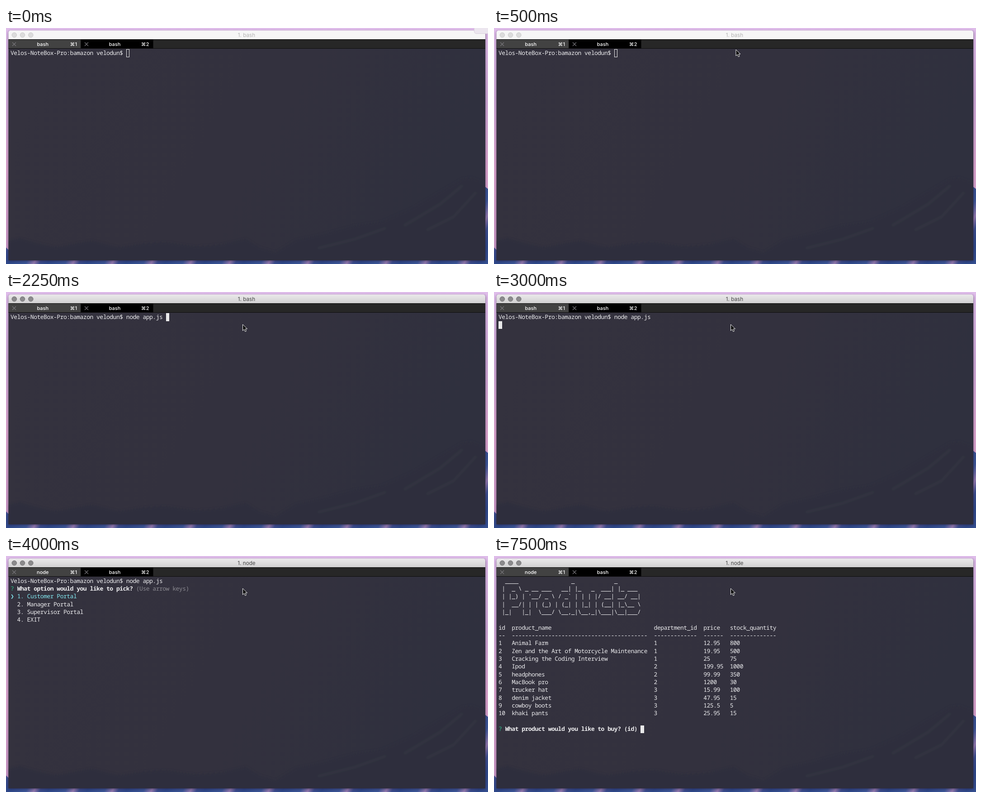
These frames come from a looping animation (1066 px wide and 525 px high, 8 s). An HTML page:

```html
<!DOCTYPE html>
<html lang="en">
<head>
<meta charset="utf-8">
<title>Terminal session</title>
<style>
  html, body { margin: 0; width: 100%; height: 100%; overflow: hidden; background: #d9b6e4; }
  #stage { position: relative; width: 1066px; height: 525px; overflow: hidden; }
  svg { position: absolute; left: 0; top: 0; }
  svg text { font: 11px Inter, sans-serif; fill: #fff; }
  #title { font-size: 11.7px; fill: #b4b4b4; text-anchor: middle; }
  .label { font-weight: 500; text-anchor: middle; }
  .key { font-weight: 500; text-anchor: end; }
  #bar { fill: #f6f6f6; }
  #lights circle { fill: #dcdcdc; stroke: #cacaca; }
  .focused #bar { fill: url(#chrome); }
  .focused #title { fill: #454545; }
  .focused #lights circle { fill: #8b8a8c; stroke: #717072; }
  #screen {
    position: absolute; left: 10px; top: 46.6px; margin: 0;
    font: 13px/17.34px "Noto Sans Mono", "DejaVu Sans Mono", monospace;
    letter-spacing: -.49px; color: #eeeef0; text-rendering: geometricPrecision;
  }
  #screen .ok { color: #2cc48c; }
  #screen .pick { color: #84eaf2; }
  #screen .hint { color: #8b8a91; }
  #caret { position: absolute; box-sizing: border-box; width: 7.5px; height: 17.5px; border: 1px solid #eee; }
  .focused #caret { background: #e9e9ea; }
</style>
</head>
<body>
<div id="stage">
  <svg width="1066" height="525">
    <defs>
      <linearGradient id="sky" x2="0" y2="1">
        <stop stop-color="#dfbdea"/><stop offset=".3" stop-color="#d0abd8"/>
        <stop offset=".6" stop-color="#dda6cf"/><stop offset="1" stop-color="#c796c4"/>
      </linearGradient>
      <linearGradient id="ridge" gradientUnits="userSpaceOnUse" x2="70" y2="34" spreadMethod="repeat">
        <stop stop-color="#2d4788"/><stop offset=".45" stop-color="#3b5596"/>
        <stop offset=".65" stop-color="#9279ad"/><stop offset=".8" stop-color="#3a4c8c"/>
        <stop offset="1" stop-color="#2d4788"/>
      </linearGradient>
      <linearGradient id="chrome" x2="0" y2="1">
        <stop stop-color="#ebeaeb"/><stop offset="1" stop-color="#d0cfd0"/>
      </linearGradient>
      <linearGradient id="glass" x2="1" y2=".25">
        <stop stop-color="#34323e"/><stop offset=".6" stop-color="#33313e"/><stop offset="1" stop-color="#2f303e"/>
      </linearGradient>
      <filter id="soft" x="-5%" y="-5%" width="110%" height="110%"><feGaussianBlur stdDeviation="2.5"/></filter>
      <clipPath id="frame"><path d="M5.5 517V10.500a5 5 0 0 1 5-5H1055a5 5 0 0 1 5 5V517Z"/></clipPath>
    </defs>

    <rect width="1066" height="525" fill="url(#sky)"/>
    <path fill="url(#ridge)" d="M0 488L6 494V517H1058V352L1066 358V525H0Z"/>
    <rect x="5" y="7" width="1056" height="512" rx="5" fill="#201830" opacity=".45" filter="url(#soft)"/>

    <g clip-path="url(#frame)">
      <rect x="5" y="45" width="1056" height="473" fill="url(#glass)"/>
      <g filter="url(#soft)">
        <path fill="#2d2f3c" d="M5 474L30 468 70 479 110 488 190 473 250 488 300 480 350 476 420 486 480 481 530 469 560 488 600 500V530H5Z"/>
        <path fill="#2d2f3d" d="M570 520L600 497 640 472 700 459 770 440 830 431 900 400 960 364 1010 335 1030 333 1064 346V530H570Z"/>
        <path fill="none" stroke="#333441" stroke-width="5" d="M1010 350L960 392 880 440M1040 365L990 420 930 450M840 445L770 470 690 490"/>
      </g>
      <rect id="bar" x="5" y="5" width="1056" height="21"/>
      <rect x="5" y="25.500" width="1056" height="20" fill="#272727"/>
      <rect x="5" y="26" width="160.500" height="19" fill="#424242"/>
      <rect x="166" y="26" width="159.500" height="19" fill="#000"/>
      <path stroke="#0c0c0c" d="M5 25.500H1061M5 45.500H1061M165.500 26V45"/>
      <path stroke="#77767a" stroke-width="1.2" d="M14 32l8 8m0-8l-8 8M174 32l8 8m0-8l-8 8"/>
    </g>
    <g id="lights">
      <circle cx="18.300" cy="15.600" r="5.300"/><circle cx="36.500" cy="15.600" r="5.300"/><circle cx="54.800" cy="15.600" r="5.300"/>
    </g>
    <text id="title" x="532" y="20"></text>
    <text id="tab" class="label" x="81.300" y="40"></text>
    <text class="key" x="157" y="40">⌘1</text>
    <text class="label" x="240.500" y="40">bash</text>
    <text class="key" x="316.500" y="40">⌘2</text>
    <path id="notice" fill="#ece6ef" stroke="#d8cfdc" d="M1035.500 -1V7q0 5.500 5.500 5.500H1067V-1Z"/>
  </svg>

  <pre id="screen"></pre>
  <div id="caret"></div>
  <svg width="1066" height="525">
    <path id="pointer" fill="#111" stroke="#f4f4f4" stroke-linejoin="round" d="M0 0V14L3.300 11 5.400 16 7.900 15 5.800 10H10Z"/>
  </svg>
</div>

<script>
const LOOP = 8000, CELL = 7.31, ROW = 17.34;
const byId = id => document.getElementById(id);
const question = text => `<span class="ok">?</span> <b>${text}</b> `;

const prompt = "Velos-NoteBox-Pro:bamazon velodun$ ";
const command = prompt + "node app.js ";

const menu = [
  command,
  question("What option would you like to pick?") + '<span class="hint">(Use arrow keys)</span>',
  '<span class="pick">❯ 1. Customer Portal</span>',
  "  2. Manager Portal",
  "  3. Supervisor Portal",
  "  4. EXIT",
].join("\n");

const banner = String.raw`  ____                _            _
 |  _ \ _ __ ___   __| |_   _  ___| |_ ___
 | |_) | '__/ _ \ / _${"`"} | | | |/ __| __/ __|
 |  __/| | | (_) | (_| | |_| | (__| |_\__ \
 |_|   |_|  \___/ \__,_|\__,_|\___|\__|___/`;

const products = [
  ["Animal Farm", 1, 12.95, 800],
  ["Zen and the Art of Motorcycle Maintenance", 1, 19.95, 500],
  ["Cracking the Coding Interview", 1, 25, 75],
  ["Ipod", 2, 199.95, 1000],
  ["headphones", 2, 99.99, 350],
  ["MacBook pro", 2, 1200, 30],
  ["trucker hat", 3, 15.99, 100],
  ["denim jacket", 3, 47.95, 15],
  ["cowboy boots", 3, 125.5, 5],
  ["khaki pants", 3, 25.95, 15],
];
const widths = [2, 41, 13, 6, 14];
const tableRow = cells => cells.map((cell, i) => String(cell).padEnd(widths[i])).join("  ");

const shop = [
  banner,
  "",
  tableRow(["id", "product_name", "department_id", "price", "stock_quantity"]),
  tableRow(widths.map(width => "-".repeat(width))),
  ...products.map((product, i) => tableRow([i + 1, ...product])),
  "",
  question("What product would you like to buy? (id)"),
].join("\n");

// Each step overrides part of the state left by the steps before it.
const steps = [
  { at: 0, text: prompt, caret: [35, 0], program: "bash", focused: false, notice: true, pointer: null },
  { at: 250, notice: false, pointer: [803, 58] },
  { at: 500, pointer: [535, 48] },
  { at: 750, focused: true, pointer: [523.5, 72] },
  { at: 1500, text: prompt + "node ", caret: [40, 0] },
  { at: 2250, text: command, caret: [47, 0] },
  { at: 3000, caret: [0, 1] },
  { at: 3500, text: menu, caret: null },
  { at: 4000, program: "node" },
  { at: 5000, text: shop, caret: [43, 19] },
];

function show(state) {
  byId("stage").classList.toggle("focused", state.focused);
  byId("screen").innerHTML = state.text;
  byId("title").textContent = "1. " + state.program;
  byId("tab").textContent = state.program;
  byId("notice").style.display = state.notice ? "" : "none";

  const caret = byId("caret").style;
  caret.display = state.caret ? "" : "none";
  if (state.caret) {
    const [column, row] = state.caret;
    caret.left = 10 + column * CELL + "px";
    caret.top = 47.3 + row * ROW + "px";
  }

  const pointer = byId("pointer");
  pointer.style.display = state.pointer ? "" : "none";
  if (state.pointer) pointer.setAttribute("transform", `translate(${state.pointer})`);
}

let shown = 0;
function tick() {
  const time = performance.now() % LOOP;
  const past = steps.filter(step => step.at <= time);
  if (past.length !== shown) {
    shown = past.length;
    show(Object.assign({}, ...past));
  }
  requestAnimationFrame(tick);
}
tick();
</script>
</body>
</html>
```
